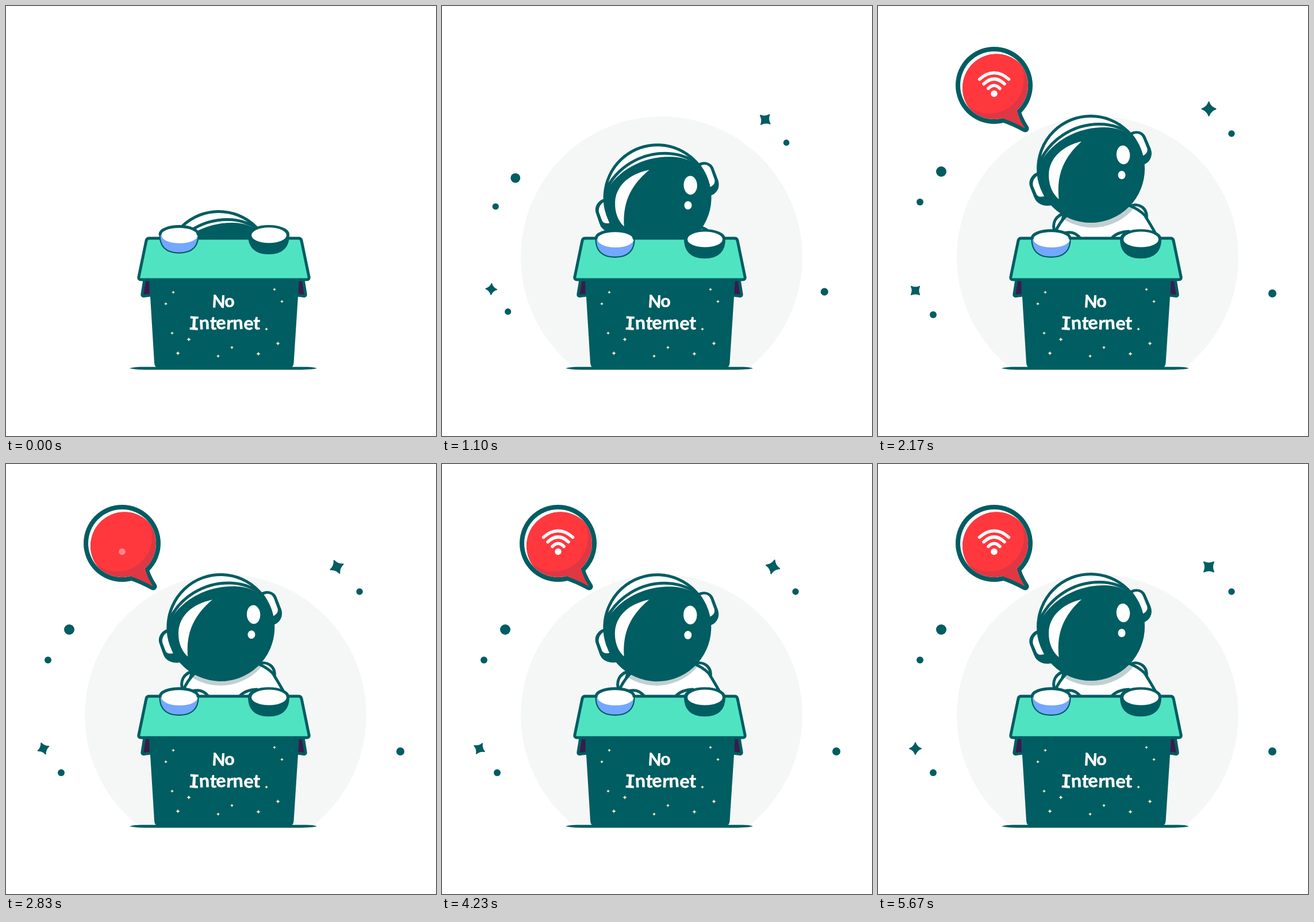
Write an HTML page that moves like this. It is 748x748 px and loops after 6030 ms.

```html
<!DOCTYPE html>
<html lang="en">
<head>
<meta charset="utf-8">
<title>No Internet</title>
<style>
  html, body { margin: 0; width: 100%; height: 100%; overflow: hidden; background: #fff; }
  svg { display: block; width: 100vw; height: 100vh; }
  .ink { fill: #005d62; }
  .line { fill: none; stroke: #005d62; stroke-width: 5; stroke-linecap: round; stroke-linejoin: round; }
  .white { fill: #fff; }
  .label { font: 700 32px Lato, sans-serif; fill: #fff; stroke: #fff; stroke-width: .6; text-anchor: middle; }
  .slab { font-family: "Noto Sans Mono", monospace; }
  .wave { fill: none; stroke: #fff; stroke-width: 5.5; stroke-linecap: round; }
</style>
</head>
<body>
<svg viewBox="0 0 748 748" xmlns="http://www.w3.org/2000/svg">
  <defs>
    <clipPath id="aboveGround"><rect width="748" height="630"/></clipPath>
    <clipPath id="shell"><circle cx="370" cy="283" r="92"/></clipPath>
    <clipPath id="suit"><path d="M330 362C320 372 313 382 308 394V430H486L483 396Q474 380 464 364C455 355 445 350 437 347Z"/></clipPath>
    <clipPath id="bubbleIn"><circle cx="202" cy="138" r="59"/></clipPath>
    <clipPath id="bubbleRed"><circle cx="206" cy="142.5" r="59"/></clipPath>
    <path id="star" d="M0-12Q3-3.2 12 0Q3.2 3 0 12Q-3 3.2-12 0Q-3.2-3 0-12Z"/>
    <path id="cup" d="M267.5 404.500C267 424 277 436.800 301 436.800C325 436.800 335 424 334.500 404.500A33.500 13.800 0 0 0 267.500 404.500Z"/>
    <g id="sideFlap">
      <path class="line" style="fill:#3a1b4b" d="M241 476L236.8 502Q237 505 240 504.6L252 503V476Z"/>
    </g>
  </defs>

  <g clip-path="url(#aboveGround)"><circle id="halo" cx="382" cy="437" r="245" fill="#f5f7f7"/></g>

  <g id="debris" class="ink">
    <circle cx="110" cy="288" r="9"/>
    <circle cx="73" cy="341" r="6"/>
    <circle cx="96" cy="537" r="6"/>
    <circle cx="686" cy="500" r="7"/>
    <circle cx="615" cy="222" r="5.7"/>
    <g transform="translate(575.5 179)"><use id="starR" href="#star" stroke="#005d62" stroke-width="2" stroke-linejoin="round"/></g>
    <g transform="translate(65 495) scale(.86)"><use id="starL" href="#star" stroke="#005d62" stroke-width="2" stroke-linejoin="round"/></g>
  </g>

  <g id="body">
    <path class="line" style="fill:#fff" d="M324 361C308 365 303 378 307 392L314 394Z"/>
    <path class="line" style="fill:#fff" d="M440 348C452 342 470 350 467 372Z"/>
    <path class="white" d="M330 362C320 372 313 382 308 394V430H486L483 396Q474 380 464 364C455 355 445 350 437 347Z"/>
    <circle cx="373" cy="291.5" r="94" fill="#c0d0d2" clip-path="url(#suit)"/>
    <path class="line" d="M330 362C320 372 313 382 308 394M437 347C445 350 455 355 464 364Q474 380 483 396M322 396Q340 389 352 404M408 402Q418 393 436 392"/>
  </g>

  <g id="head">
    <path class="line" style="fill:#005d62" d="M441 222C449 218 459 220 463 228L472 249C476 260 471 271 459 274L440 275Z"/>
    <path class="white" d="M443 224C450 220 458 222 461 230L468 247C470 254 466 258 460 261C455 245 450 233 443 224Z"/>
    <path class="line" style="fill:#005d62" d="M281 291C270 293 263.500 304 266.500 313L274 332C278 343 290 347 302 344L290 300Z"/>
    <path class="white" d="M280 294C272 297 267.500 306 270 314L276 328C279 333 284 332 289 331C284 320 280 307 280 294Z"/>
    <circle class="white" cx="370" cy="283" r="92"/>
    <g clip-path="url(#shell)">
      <path class="ink" d="M274 289C295 237 345 211 393 211C415 211 432 218 446 230L480 250V400H260Z"/>
      <path class="line" d="M278 279C296 232 340 205.500 385 205.500C407 205.500 427 212 446 228"/>
    </g>
    <circle class="line" cx="370" cy="283" r="91.500"/>
    <path class="white" d="M354 235.500C314 245.500 297 270 297 294C297 314 305 328 314.500 336C311 300 318 268 354 235.500Z"/>
    <ellipse class="white" cx="426.500" cy="259" rx="11.700" ry="16.300" transform="rotate(-5 426.5 259)"/>
    <ellipse class="white" cx="424" cy="294" rx="6.500" ry="7.300"/>
  </g>

  <g id="box">
    <use href="#sideFlap"/>
    <use href="#sideFlap" transform="matrix(-1 0 0 1 758 0)"/>
    <path class="ink" d="M249 474H510L500.500 621Q500 630 491 630H267Q258.500 630 258 621Z"/>
    <path class="ink" d="M215 630.300Q222 627.700 234 627.700H523Q535 627.700 541 630.300Q533 632.800 505 632.800H250Q224 632.800 215 630.300Z"/>
    <path class="line" style="fill:#50e3c2" d="M249 404H509Q513 404 514 408L527 471Q528 476 523 476H235Q230 476 231 471L244 408Q245 404 249 404Z"/>
    <g id="sparkles" fill="#fff1c4"></g>
    <text class="label" x="378" y="524" style="font-size:30px" rotate="3 -3">No</text>
    <text class="label" x="379.500" y="562.500" rotate="3 -2 2 -4 2 -3 3 1"><tspan class="slab">I</tspan>nternet</text>
  </g>

  <g id="hands">
    <use href="#cup" fill="#74a7ff" stroke="#005d62" stroke-width="2.200"/>
    <ellipse class="white" cx="302" cy="406" rx="31.500" ry="14"/>
    <path class="line" d="M268 404A33 13.200 0 0 1 334 404"/>
    <use href="#cup" x="156" class="line" style="fill:#005d62"/>
    <ellipse class="white" cx="457.500" cy="406" rx="30.500" ry="13.500"/>
  </g>

  <g id="bubble">
    <circle class="ink" cx="202" cy="138" r="67"/>
    <path class="ink" d="M218 196Q236 202 256 213Q246 198 242 184Z" stroke="#005d62" stroke-width="13" stroke-linejoin="round"/>
    <circle class="white" cx="202" cy="138" r="59"/>
    <g clip-path="url(#bubbleIn)">
      <circle cx="206" cy="142.500" r="59" fill="#df3743"/>
      <circle cx="194" cy="127" r="60" fill="#ff383d" clip-path="url(#bubbleRed)"/>
    </g>
    <path d="M216 195Q236 202 256 213Q246 198 242 182Z" fill="#df3743"/>
    <g id="wifi">
      <circle class="white" cx="202" cy="152.500" r="5.700"/>
      <path class="wave" d="M192 143.500Q202 133 212 143.500"/>
      <path class="wave" d="M184 135.500Q202 118.500 220 135.500"/>
      <path class="wave" d="M176.500 127.500Q202 105 227.500 127.500"/>
    </g>
  </g>
</svg>
<script>
const LOOP = 6030;
const $ = id => document.getElementById(id);
const put = (id, value) => $(id).setAttribute("transform", value);

// Smooth monotone curve through [time, value] keys, level at peaks and ends.
function track(keys) {
  const rate = i => (keys[i + 1][1] - keys[i][1]) / (keys[i + 1][0] - keys[i][0]);
  const slope = keys.map((_, i) => {
    if (i === 0 || i === keys.length - 1) return 0;
    const a = rate(i - 1), b = rate(i);
    return a * b <= 0 ? 0 : 2 * a * b / (a + b);
  });
  return t => {
    if (t <= keys[0][0]) return keys[0][1];
    const i = keys.findIndex(k => k[0] > t) - 1;
    if (i < 0) return keys[keys.length - 1][1];
    const [t0, v0] = keys[i], [t1, v1] = keys[i + 1];
    const d = t1 - t0, u = (t - t0) / d, w = 1 - u;
    return w * w * ((1 + 2 * u) * v0 + u * d * slope[i])
         + u * u * ((3 - 2 * u) * v1 - w * d * slope[i + 1]);
  };
}

const rise = track([[0, 166], [670, 105], [1570, 3.8], [1800, 0]]);
const tilt = track([[500, 0], [670, 0.5], [1330, 3.2], [2100, 0], [3600, 4], [5100, 0]]);
const handLift = track([[0, -7.2], [500, 0]]);
const haloSize = track([[100, 0], [670, 0.898], [950, 1]]);
const spread = track([[400, 0], [670, 0.445], [1270, 1]]);
const pop = track([[1300, 0], [1570, 0.765], [1750, 1.16], [1950, 1]]);
const spin = track([[0, 80], [1570, 20], [2170, 0], [3430, -45], [4230, -75], [5130, -135]]);
const waves = [0, 1, 2, 3].map(i => {
  const on = 2750 + i * 190;
  return track([[2580, 1], [2700, 0], [on, 0], [on + 190, 1]]);
});

const scaleAt = (x, y, s) => `translate(${x} ${y}) scale(${s}) translate(${-x} ${-y})`;

$("sparkles").innerHTML = [
  [291, 498, 3], [278, 518, 3], [467, 493, 3], [480, 514, 3], [453, 562, 3], [289, 569, 3],
  [318, 580, 4], [473, 587, 4], [299, 604, 4], [393, 594, 3.6], [369, 609, 3.6], [439, 605, 4]
].map(([x, y, r]) =>
  `<path transform="translate(${x} ${y}) scale(${r})" d="M0-1Q.1-.1 1 0Q.1.1 0 1Q-.1.1-1 0Q-.1-.1 0-1Z"/>`
).join("");

function draw(t) {
  const y = rise(t);
  put("head", `translate(0 ${y}) rotate(${tilt(t)} 344 383)`);
  put("body", `translate(0 ${y * 0.8})`);
  put("hands", `translate(0 ${handLift(t)})`);
  put("halo", scaleAt(382, 630, haloSize(t)));
  put("debris", scaleAt(376, 457, spread(t)));
  put("bubble", scaleAt(276, 214, pop(t)));
  put("starR", `rotate(${spin(t)})`);
  put("starL", `rotate(${45 - spin(t)})`);
  [...$("wifi").children].forEach((part, i) => part.setAttribute("opacity", waves[i](t)));
}

const start = performance.now();
function tick() {
  draw((performance.now() - start) % LOOP);
  requestAnimationFrame(tick);
}
tick();
</script>
</body>
</html>
```
